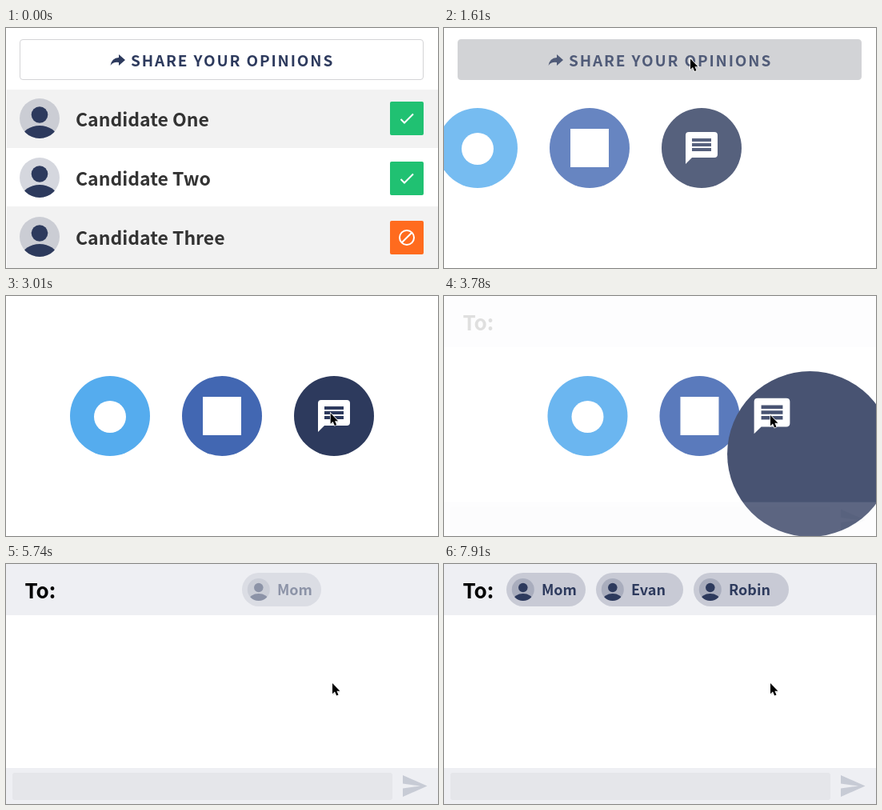
These frames come from a looping animation (540x300 px, 8 s). An HTML page:

```html
<!DOCTYPE html>
<html lang="en">
<head>
<meta charset="utf-8">
<title>Share your opinions</title>
<style>
  html, body { margin: 0; width: 100%; height: 100%; overflow: hidden; background: #fff; }
  svg { display: block; width: 540px; height: 300px; }
  text { font: 700 23px "Noto Sans CJK JP", "Noto Sans CJK SC", "Noto Sans CJK", "Noto Sans", sans-serif; }
  .navy { fill: #2d3a5d; }
  .tint { fill: #2d3a5d; fill-opacity: .2; }
  .line { fill: none; stroke: #fff; stroke-width: 2; }
</style>
</head>
<body>
<svg viewBox="0 0 540 300">
  <defs>
    <clipPath id="round"><circle r="25"/></clipPath>
    <g id="avatar">
      <circle r="25" class="tint"/>
      <g class="navy" clip-path="url(#round)">
        <circle cy="-4.5" r="10.3"/>
        <ellipse cy="24" rx="22" ry="15"/>
      </g>
    </g>
  </defs>

  <g id="list"></g>

  <g id="button">
    <rect id="plate" x="17.5" y="14.5" width="504" height="50" rx="3.5"/>
    <path class="navy" d="M141 33L149 40L141 47V43Q134 42 130.500 47Q132 37.500 141 37Z"/>
    <text class="navy" x="156" y="48" style="font-size:19px;letter-spacing:1.85px">SHARE YOUR OPINIONS</text>
  </g>

  <g id="share">
    <g id="others">
      <circle cx="130" cy="150" r="50" fill="#55acee"/>
      <circle cx="130" cy="151" r="20" fill="#fff"/>
      <circle cx="270" cy="150" r="50" fill="#4267b2"/>
      <rect x="246" y="126" width="48" height="48" fill="#fff"/>
    </g>
    <circle id="disc" class="navy"/>
    <path id="bubble" fill="#fff" fill-rule="evenodd" d="M16-20H-16Q-20-20-20-16V20L-12 12H16Q20 12 20 8V-16Q20-20 16-20ZM-12-12H12V-8H-12ZM-12-6H12V-2H-12ZM-12 0H12V4H-12Z"/>
  </g>

  <g id="message">
    <rect width="540" height="64" fill="#eeeff3"/>
    <text x="23.500" y="43" style="font-size:26px">To:</text>
    <g id="footer">
      <rect y="255" width="540" height="45" fill="#eeeff3"/>
      <rect x="8" y="261" width="475" height="34" rx="3" fill="#e5e6ea"/>
      <path class="tint" d="M496 264L526.500 277.500L496 291V280.500L518 277.500L496 274.500Z"/>
    </g>
  </g>
  <g id="chips"></g>

  <g id="cursor">
    <path d="M.5 1.500V14.500L10 11Z" fill="#000" opacity=".15"/>
    <path d="M0 0V13.200L3 10.500L5.200 15.500L7.500 14.500L5.400 9.700H9.400Z" stroke="#fff" stroke-width="1.400" paint-order="stroke"/>
  </g>
</svg>
<script>
const STEP = 70, LOOP = 8000;
const $ = id => document.getElementById(id);
const clamp = v => Math.min(1, Math.max(0, v));
const span = (t, from, to) => clamp((t - from) / (to - from));
const mix = (a, b, p) => a + (b - a) * p;
const smooth = p => p * p * (3 - 2 * p);
const move = (el, x, y = 0) => el.setAttribute('transform', `translate(${x} ${y})`);
const set = (el, attrs) => { for (const k in attrs) el.setAttribute(k, attrs[k]); };

const CHECK = '<path class="line" d="M-7.500 1L-3 5.500L8-5.500"/>';
const BLOCK = '<circle class="line" r="9"/><path class="line" d="M-6.300 6.300L6.300-6.300"/>';
const rows = [
  ['One', 77, 73, '#f2f2f2', '#20c172', CHECK],
  ['Two', 150, 73, '#fff', '#20c172', CHECK],
  ['Three', 223, 77, '#f2f2f2', '#ff6b1e', BLOCK],
];
$('list').innerHTML = rows.map(([name, y, h, back, color, icon], i) => {
  const mid = 113 + 74 * i;
  return `<rect x="1" y="${y}" width="539" height="${h}" fill="${back}"/>
    <use href="#avatar" x="42" y="${mid}"/>
    <text x="87" y="${mid + 10}" fill="#333">Candidate ${name}</text>
    <g transform="translate(501 ${[113, 188, 262][i]})">
      <rect x="-21" y="-21" width="42" height="42" rx="2" fill="${color}"/>${icon}
    </g>`;
}).join('');

const chips = [
  { name: 'Mom', x: 78, width: 99, start: 5740, fade: 140 },
  { name: 'Evan', x: 190, width: 109, start: 6720, fade: 70 },
  { name: 'Robin', x: 312, width: 119, start: 7630, fade: 70 },
];
$('chips').innerHTML = chips.map(c => `<g>
  <rect class="tint" y="11" width="${c.width}" height="42" rx="21"/>
  <use href="#avatar" transform="translate(20.800 32) scale(.56)"/>
  <text class="navy" x="44" y="39" style="font-size:18px">${c.name}</text></g>`).join('');
chips.forEach((c, i) => c.el = $('chips').children[i]);

function drawButton(t) {
  const pressed = t >= 1470, p = (t - 1610) / 420;
  const fill = pressed
    ? `rgb(${mix(202, 147, p)},${mix(203, 152, p)},${mix(206, 173, p)})` : '#fff';
  set($('plate'), { fill, stroke: pressed ? fill : '#d4d4d6' });
  set($('button'), { opacity: 1 - span(t, 1498, 2159) });

  const gone = span(t, 1400, 1540);
  set($('list'), { opacity: 1 - gone });
  move($('list'), 10 * gone);
}

function drawShare(t) {
  const arrive = span(t, 1440, 2030), open = span(t, 3749, 3990);
  const grow = open / .13;
  set($('share'), { opacity: span(t, 1440, 1652) * (1 - open) });
  move($('share'), -244 * (1 - arrive) ** 3);
  move($('others'), 50 * grow);
  set($('disc'), { cx: 410 + 48 * grow, cy: 150 + 48 * grow, r: 50 + 54 * grow });
  set($('bubble'), { transform: `translate(410 150) scale(${1 + .12 * grow})` });
  set($('message'), { opacity: open });
  move($('footer'), 0, 3 * (1 - open));
}

function drawChips(t) {
  for (const c of chips) {
    const p = span(t, c.start, c.start + 280);
    set(c.el, { opacity: span(t, c.start - 70, c.start - 70 + c.fade) });
    move(c.el, c.x + 217 * (1 - p) ** 2);
  }
}

function drawCursor(t) {
  const a = smooth(span(t, 490, 1190)), b = smooth(span(t, 2310, 3080));
  const curve = (p0, p1, p2) => p0 * (1 - a) ** 2 + 2 * p1 * a * (1 - a) + p2 * a * a;
  set($('cursor'), { opacity: t < 560 ? 0 : 1 });
  move($('cursor'), curve(408, 358, 308) + 100 * b, curve(51, 23, 38.5) + 110.5 * b);
}

const began = performance.now();
function frame() {
  const elapsed = (performance.now() - began) % LOOP;
  const t = Math.floor(elapsed / STEP) * STEP;
  drawButton(t);
  drawShare(t);
  drawChips(t);
  drawCursor(t);
  requestAnimationFrame(frame);
}
frame();
</script>
</body>
</html>
```
